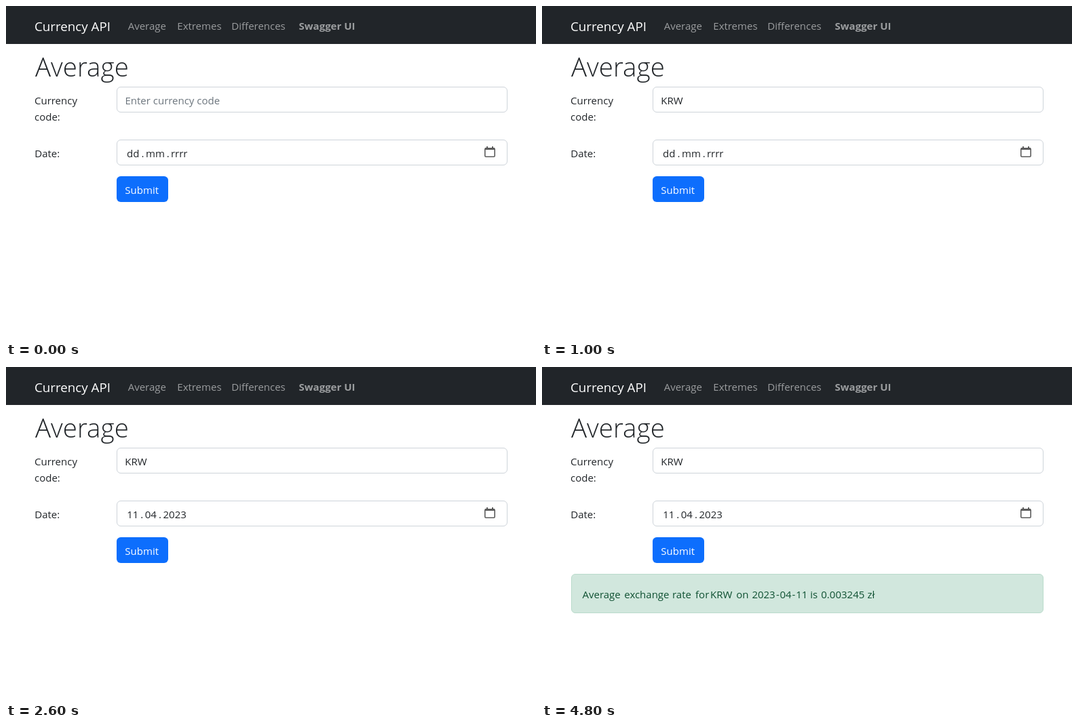
These frames come from a looping animation (781x491 px, 6 s). An HTML page:

```html
<!DOCTYPE html>
<html lang="en">
<head>
<meta charset="utf-8">
<title>Currency API</title>
<style>
  html, body { margin: 0; width: 100%; height: 100%; overflow: hidden; background: #fff; }
  svg { display: block; width: 781px; height: 491px; }
  text { font: 400 15px "Open Sans", "Noto Sans", sans-serif; fill: #212529; }
  .brand { font-size: 18.75px; fill: #fff; }
  .link { fill: #9b9d9f; }
  .bold { font-weight: 700; }
  .title { font-size: 38.5px; font-weight: 300; }
  .hint { fill: #6c757d; }
  .light { fill: #fff; }
  .field { fill: #fff; stroke: #ced4da; }
  .alert { fill: #d1e7dd; stroke: #badbcc; }
  .result text { fill: #0f5132; }
</style>
</head>
<body>
<svg viewBox="0 0 781 491">
  <rect width="781" height="56" fill="#212529"/>
  <text class="brand" x="42" y="37">Currency API</text>
  <text class="link" x="179.7" y="35">Average</text>
  <text class="link" x="252.3" y="35">Extremes</text>
  <text class="link" x="332.3" y="35">Differences</text>
  <text class="link bold" x="431.5" y="35">Swagger UI</text>

  <text class="title" x="43" y="104">Average</text>

  <text x="42" y="145">Currency</text>
  <text x="42" y="169">code:</text>
  <rect class="field" x="163.5" y="119.5" width="575" height="37" rx="5.5"/>
  <text id="codeHint" class="hint" x="175.5" y="145">Enter currency code</text>
  <text id="code" x="175.3" y="145">KRW</text>

  <text x="42.3" y="223">Date:</text>
  <rect class="field" x="163.5" y="197.5" width="575" height="37" rx="5.5"/>
  <g id="dateHint"></g>
  <g id="date"></g>
  <g fill="#5c5c5c">
    <rect x="705.8" y="209.8" width="14.4" height="12.4" rx="1.5" fill="none" stroke="#5c5c5c" stroke-width="1.6"/>
    <rect x="706" y="209" width="14" height="3"/>
    <rect x="708" y="207" width="2" height="3"/>
    <rect x="716" y="207" width="2" height="3"/>
  </g>

  <rect x="163" y="251" width="76" height="38" rx="6" fill="#0d6efd"/>
  <text class="light" x="175.3" y="277">Submit</text>

  <g id="result" class="result">
    <rect class="alert" x="43.5" y="305.5" width="695" height="57" rx="5.5"/>
    <g id="message"></g>
  </g>
</svg>
<script>
  const LOOP = 6000;
  const byId = id => document.getElementById(id);

  // Each piece is [x, text] on a shared baseline.
  function setLine(id, y, pieces) {
    for (const [x, content] of pieces) {
      const text = document.createElementNS(byId(id).namespaceURI, "text");
      text.setAttribute("x", x);
      text.setAttribute("y", y);
      text.textContent = content;
      byId(id).append(text);
    }
  }

  setLine("dateHint", 223, [[178, "dd"], [199.5, "."], [206, "mm"], [236.7, "."], [243, "rrrr"]]);
  setLine("date", 223, [[178.3, "11"], [198.3, "."], [204.7, "04"], [225, "."], [231.5, "2023"]]);
  setLine("message", 341, [
    [59.5, "Average"], [121.3, "exchange"], [192, "rate"], [226, "for"],
    [248, "KRW"], [286.3, "on"], [309.4, "2023"], [345, "-"], [350.5, "04"],
    [368.6, "-"], [374.2, "11"], [395.2, "is"], [411.3, "0.003245"], [479.6, "zł"]
  ]);

  function show(id, on) {
    byId(id).style.display = on ? "" : "none";
  }

  function draw(time) {
    const t = time % LOOP;
    show("codeHint", t < 1000);
    show("code", t >= 1000);
    show("dateHint", t < 2000);
    show("date", t >= 2000);
    show("result", t >= 3000);
  }

  const start = performance.now();
  function tick() {
    draw(performance.now() - start);
    requestAnimationFrame(tick);
  }
  tick();
</script>
</body>
</html>
```
